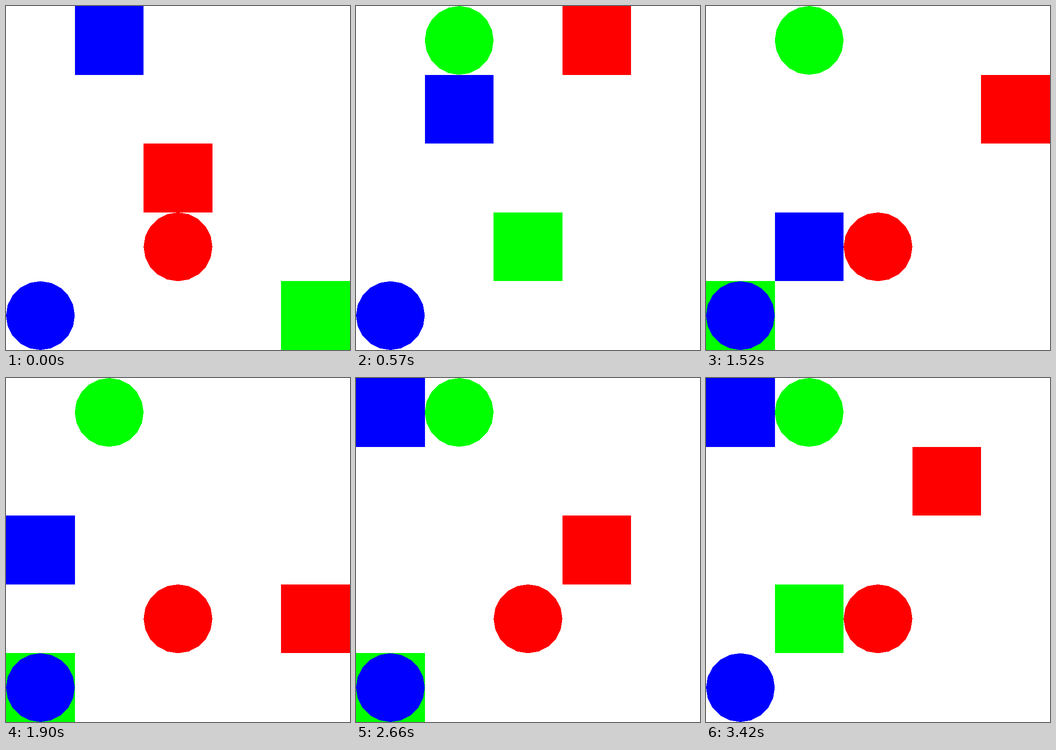
An HTML page that plays this animation: 748x748 px, repeating every 3610 ms.

```html
<!DOCTYPE html>
<html lang="en">
<head>
<meta charset="utf-8">
<title>Grid walkers</title>
<style>
  html, body { margin: 0; width: 100%; height: 100%; overflow: hidden; background: #fff; }
  svg { display: block; width: 100%; height: 100%; }
</style>
</head>
<body>
<svg id="stage" viewBox="0 0 748 748" shape-rendering="crispEdges"></svg>
<script>
const CELL = 748 / 5, STEP = 190, SIDES = 20;
const MOVES = { U: [0, -1], D: [0, 1], L: [-1, 0], R: [1, 0], '.': [0, 0] };

// Each walker is a square taking one grid step per tick; its goal is a fixed disc.
const walkers = [
  { color: '#f00', start: [2, 2], goal: [2, 3], path: 'URU.DLRRDDUDLUD.UU' },
  { color: '#0f0', start: [4, 4], goal: [1, 0], path: 'LLUDLL......RL..RU' },
  { color: '#00f', start: [1, 0], goal: [0, 4], path: 'DUDDDD.UULUU...RL.' },
];
const TICKS = walkers[0].path.length + 1;

function add(tag, attrs) {
  const el = document.createElementNS('http://www.w3.org/2000/svg', tag);
  for (const key in attrs) el.setAttribute(key, attrs[key]);
  return document.getElementById('stage').appendChild(el);
}

function discPoints([col, row]) {
  return Array.from({ length: SIDES }, (_, i) => {
    const a = i * 2 * Math.PI / SIDES;
    return [(col + 0.5 + Math.cos(a) / 2) * CELL, (row + 0.5 + Math.sin(a) / 2) * CELL];
  }).join(' ');
}

for (const w of walkers) {
  w.square = add('rect', { width: CELL, height: CELL, fill: w.color });
  add('polygon', { points: discPoints(w.goal), fill: w.color });
}

function draw() {
  const tick = Math.floor(performance.now() / STEP) % TICKS;
  for (const w of walkers) {
    let [col, row] = w.start;
    for (const move of w.path.slice(0, tick)) {
      col += MOVES[move][0];
      row += MOVES[move][1];
    }
    w.square.setAttribute('x', col * CELL);
    w.square.setAttribute('y', row * CELL);
  }
  requestAnimationFrame(draw);
}
draw();
</script>
</body>
</html>
```
